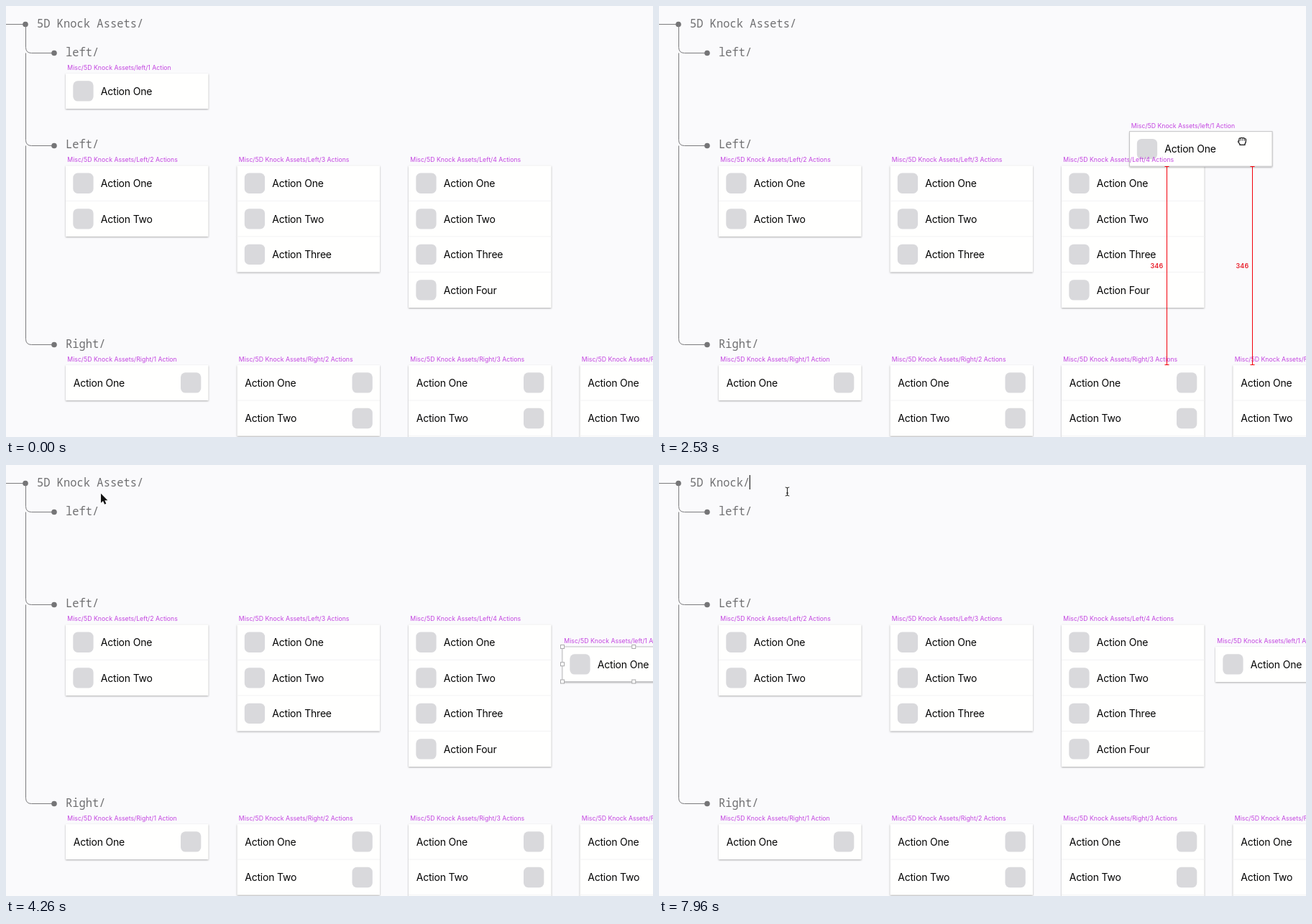
Write an HTML page that moves like this. It is 900 px wide and 600 px high and loops after 8 s.

```html
<!DOCTYPE html>
<html lang="en">
<head>
<meta charset="utf-8">
<title>Asset tree</title>
<style>
  html, body { margin: 0; width: 100%; height: 100%; overflow: hidden; background: #fafafc; }
  svg { display: block; }
  .head { font: 15.45px "Noto Sans Mono", monospace; fill: #6f6f71; }
  .row { font: 14px Inter, sans-serif; letter-spacing: -.2px; fill: #050505; }
  .label { font: 8.73px Inter, sans-serif; fill: #c344e0; }
  .gap { font: 600 9px Inter, sans-serif; letter-spacing: .2px; fill: #e8202c; text-anchor: end; }
  .card { fill: #fffffe; filter: drop-shadow(0 1.1px .9px rgba(0, 0, 0, .32)); }
  .icon { fill: #d9d9dc; }
  .rule { stroke: #f3f3f4; }
  .tree { fill: none; stroke: #7c7c7e; }
  .dot { fill: #757577; }
  .guide { stroke: #f3000b; }
  .hover { stroke: #4a9bf0; fill: none; }
  .frame { fill: none; stroke: #c4c4c6; }
  .handle { fill: #fff; stroke: #a9a9ab; }
</style>
</head>
<body>
<svg id="stage" width="900" height="600" viewBox="0 0 900 600"></svg>
<script>
const LOOP = 8000;
const ROW = 49.55, WIDTH = 198.5, STEP = 238.5, LEFT = 83;
const CHAR = 9.27, HEAD_X = 43;
const PRODUCT = '5D Knock';
const stage = document.getElementById('stage');

function add(parent, tag, attrs = {}, text) {
  const node = document.createElementNS('http://www.w3.org/2000/svg', tag);
  for (const key in attrs) node.setAttribute(key, attrs[key]);
  if (text !== undefined) node.textContent = text;
  parent.append(node);
  return node;
}
const group = parent => add(parent, 'g');
const line = (parent, cls, x1, y1, x2, y2) => add(parent, 'line', { class: cls, x1, y1, x2, y2 });
const show = (node, on) => node.setAttribute('visibility', on ? 'visible' : 'hidden');
const move = (node, x, y) => node.setAttribute('transform', `translate(${x} ${y})`);
const within = (t, from, to) => t >= from && t < to;

const tree = group(stage), cards = group(stage), labels = group(stage), overlay = group(stage);

// Folder tree
function branch(y0, y1) {
  add(tree, 'path', { class: 'tree', d: `M27.5 ${y0}V${y1 - 8}Q27.5 ${y1} 35.5 ${y1}H67` });
  add(tree, 'circle', { class: 'dot', cx: 67, cy: y1, r: 3.8 });
}
const heading = (text, x, y) => add(tree, 'text', { class: 'head', x, y }, text);

line(tree, 'tree', 0, 25.5, 27, 25.5);
add(tree, 'circle', { class: 'dot', cx: 27, cy: 25.5, r: 3.8 });
branch(25.5, 65.5);
branch(65.5, 194.5);
branch(194.5, 471.5);
const selection = add(tree, 'rect', { x: 126, y: 14, width: 57.5, height: 20, fill: '#dedede' });
const title = heading('', HEAD_X, 29.5);
heading('left/', LEFT, 69.5);
heading('Left/', LEFT, 198);
heading('Right/', LEFT, 475.5);

// Cards
const NAMES = ['One', 'Two', 'Three', 'Four'];

function card(x, y, count, side) {
  const body = group(cards), label = group(labels);
  const right = side === 'Right';
  add(body, 'rect', { class: 'card', width: WIDTH, height: count * ROW - .5 });
  for (let i = 0; i < count; i++) {
    const top = i * ROW;
    if (i) line(body, 'rule', 0, top - .5, WIDTH, top - .5);
    add(body, 'rect', { class: 'icon', x: right ? 160 : 10.3, y: top + 10.3, width: 28.3, height: 28.3, rx: 6.5 });
    add(body, 'text', { class: 'row', x: right ? 10.7 : 48.8, y: top + 29.8 }, 'Action ' + NAMES[i]);
  }
  const noun = count > 1 ? 'Actions' : 'Action';
  add(label, 'text', { class: 'label', x: 2.3, y: -5 }, `Misc/${PRODUCT} Assets/${side}/${count} ${noun}`);
  const place = (px, py) => { move(body, px, py); move(label, px, py); };
  place(x, y);
  return place;
}

for (let n = 2; n <= 4; n++) card(LEFT + (n - 2) * STEP, 222.3, n, 'Left');
for (let n = 1; n <= 4; n++) card(LEFT + (n - 1) * STEP, 500, n, 'Right');
const placeMover = card(LEFT, 94, 1, 'left');

// Hover marks, selection marks, guides and distances
const cardHover = add(overlay, 'rect', { class: 'hover', x: LEFT, y: 94, width: WIDTH, height: 48.5 });
const leftHover = line(overlay, 'hover', LEFT + .5, 72.5, 130, 72.5);
const titleHover = line(overlay, 'hover', HEAD_X, 32.5, 191.5, 32.5);

const frame = (w, h) => add(overlay, 'rect', { class: 'frame', width: w, height: h });
function handles(w, h) {
  const box = group(overlay);
  for (const fx of [0, .5, 1]) for (const fy of [0, .5, 1]) {
    if (fx === .5 && fy === .5) continue;
    add(box, 'rect', { class: 'handle', x: fx * w - 2.5, y: fy * h - 2.5, width: 5, height: 5 });
  }
  return box;
}
const cardFrame = frame(WIDTH, 48.5), cardHandles = handles(WIDTH, 48.5);
const titleMarks = [frame(150, 19), handles(150, 19)];
for (const mark of titleMarks) move(mark, 43, 17);

const midGuide = line(overlay, 'guide', 302.5, 96, 302.5, 600);
const edgeGuide = line(overlay, 'guide', 758.5, 222, 758.5, 600);
const topGuide = line(overlay, 'guide', LEFT, 222.5, 900, 222.5);

const gaps = group(overlay);
for (const x of [706.5, 825.5]) {
  line(gaps, 'guide', x, 223, x, 500);
  for (const y of [223.5, 499.5]) line(gaps, 'guide', x - 3, y, x + 3, y);
  add(gaps, 'text', { class: 'gap', x: x - 5, y: 365 }, '346');
}

const caret = line(overlay, 'caret', 0, 14, 0, 34);
caret.setAttribute('stroke', '#222');
caret.setAttribute('stroke-width', 1.2);

// Pointers
const pointer = group(stage);
const arrow = add(pointer, 'path', {
  d: 'M0 0V13L3 10.3 5.1 15 7.3 14 5.3 9.5H9.3Z',
  fill: '#111', stroke: '#fff', 'stroke-width': 1, 'paint-order': 'stroke'
});
const hand = group(pointer);
add(hand, 'path', {
  d: 'M-3.3 5.3V4L-5.3 1.6Q-6-.6-4.3-.9V-2.8Q-3.8-4.7-2.1-4Q-.7-5.6 .8-4.2Q2.5-5.2 3.4-3.6Q5.3-3.7 5.3-1.8Q5.5 1.5 3.8 4V5.3Z',
  fill: '#fff', stroke: '#111', 'stroke-width': 1.2, 'stroke-linejoin': 'round'
});
add(hand, 'path', { d: 'M-4.3-1V1.2M-1.9-3.6V-.4M.7-3.9V-.4M3.2-3.3V-.4', fill: 'none', stroke: '#222', 'stroke-width': .9 });
const beam = group(pointer);
for (const [stroke, width] of [['#fff', 2.4], ['#222', 1.1]]) {
  add(beam, 'path', {
    d: 'M-2.8-6Q-.3-6 0-4.6Q.3-6 2.8-6M0-4.6V4.6M-2.8 6Q-.3 6 0 4.6Q.3 6 2.8 6M-1.5 2H1.5',
    fill: 'none', stroke, 'stroke-width': width
  });
}

// Keys are [time, x, y]; the curve between them never overshoots.
const cursorPath = [
  [660, 903, 73], [780, 850, 75], [1000, 500, 90], [1260, 262, 106], [1460, 239, 107],
  [1600, 242, 107], [1900, 288, 107], [2130, 416, 108], [2300, 630, 152], [2530, 811, 188],
  [2930, 858, 230], [3130, 872, 246], [3250, 875, 255], [3420, 740, 225], [3700, 300, 118],
  [3960, 136, 77], [4000, 134, 75], [4060, 131, 66], [4200, 131, 66], [4260, 132, 40],
  [4360, 139, 27], [4530, 139, 27], [4560, 139.5, 25], [5360, 139.5, 25], [5560, 149.5, 25],
  [7600, 149.5, 25], [7960, 178.5, 37]
];
const cardPath = [
  [1500, 83, 94], [1700, 87, 94.2], [1950, 120, 95], [2130, 203, 96.5], [2300, 442, 140],
  [2530, 654, 174.5], [2720, 728, 207], [2930, 758.5, 236], [3130, 758.5, 238], [3240, 774, 253]
];

function sample(keys, t, axis) {
  const last = keys.length - 1;
  if (t <= keys[0][0]) return keys[0][axis];
  if (t >= keys[last][0]) return keys[last][axis];
  const i = keys.findIndex(key => key[0] > t) - 1;
  const slope = k => (keys[k + 1][axis] - keys[k][axis]) / (keys[k + 1][0] - keys[k][0]);
  const tangent = k => {
    if (k === 0 || k === last) return 0;
    const a = slope(k - 1), b = slope(k);
    return a * b > 0 ? 2 * a * b / (a + b) : 0;
  };
  const [p, q] = [keys[i], keys[i + 1]];
  const span = q[0] - p[0], u = (t - p[0]) / span, v = 1 - u;
  return v * v * (1 + 2 * u) * p[axis] + u * u * (3 - 2 * u) * q[axis]
    + span * u * v * (v * tangent(i) - u * tangent(i + 1));
}

function render(t) {
  const cardX = sample(cardPath, t, 1), cardY = sample(cardPath, t, 2);
  placeMover(cardX, cardY);
  move(cardFrame, cardX, cardY);
  move(cardHandles, cardX, cardY);
  show(cardFrame, within(t, 1500, 4930));
  show(cardHandles, within(t, 1500, 1580) || within(t, 3260, 4930));
  show(cardHover, within(t, 1260, 1500));
  show(leftHover, within(t, 4000, 4200));
  show(titleHover, within(t, 4300, 4930));
  for (const mark of titleMarks) show(mark, within(t, 4930, 5360));
  show(midGuide, within(t, 2115, 2160));
  show(edgeGuide, within(t, 2900, 3160));
  show(topGuide, within(t, 2600, 2900) && Math.abs(cardY - 222.5) < 4);
  topGuide.setAttribute('x2', cardX + WIDTH);
  show(gaps, within(t, 2515, 2560));

  // Title editing
  const tail = t < 6930 ? ' Assets/' : t < 7330 ? ' /' : '/';
  if (title.textContent !== PRODUCT + tail) title.textContent = PRODUCT + tail;
  show(selection, within(t, 5460, 6930));
  show(caret, within(t, 5360, 5460) || t >= 6930);
  const column = t < 5460 ? 11 : within(t, 7330, 7500) ? 8 : 9;
  caret.setAttribute('x1', HEAD_X + column * CHAR);
  caret.setAttribute('x2', HEAD_X + column * CHAR);

  move(pointer, sample(cursorPath, t, 1), sample(cursorPath, t, 2));
  const dragging = within(t, 1500, 3250);
  show(arrow, within(t, 660, 5360) && !dragging);
  show(hand, dragging);
  show(beam, within(t, 5360, 7000) || t >= 7600);
}

function tick() {
  render(performance.now() % LOOP);
  requestAnimationFrame(tick);
}
tick();
</script>
</body>
</html>
```
